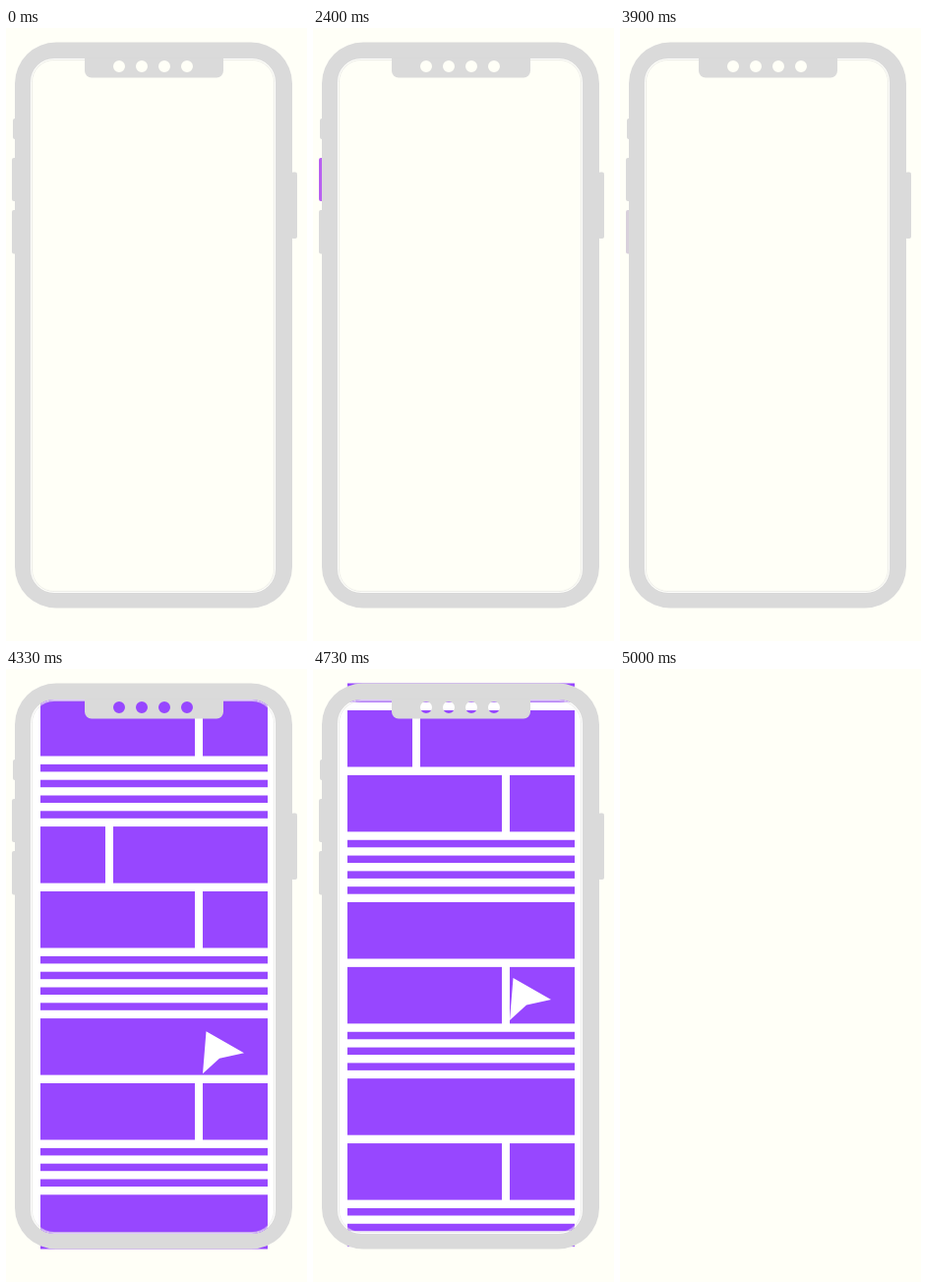
Animation of 306 by 623 pixels, one loop 5510 ms. Source, as an HTML page with a canvas:

```html
<!DOCTYPE html>
<html lang="en">
<head>
<meta charset="utf-8">
<title>Phone buttons and scroll</title>
<style>
  html, body { margin: 0; width: 100%; height: 100%; overflow: hidden; background: #fffff7; }
  canvas { display: block; width: 306px; height: 623px; }
</style>
</head>
<body>
<canvas id="stage" width="306" height="623"></canvas>
<script>
const ctx = document.getElementById('stage').getContext('2d');
const LOOP = 5510;
const PAPER = '#fffff7', PURPLE = '#9747ff', GREY = [218, 218, 218];
const rgb = c => `rgb(${c.map(Math.round).join(',')})`;
const clamp = v => Math.min(1, Math.max(0, v));
const progress = (t, from, to) => clamp((t - from) / (to - from));
const ease = p => (1 - Math.cos(Math.PI * p)) / 2;

// Rises quickly, holds near the middle, falls back
const pulse = (t, from, to) =>
  Math.min(1, 1.38 * Math.sin(Math.PI * progress(t, from, to)));

const buttons = [
  { x: 7, y: 92, w: 4, h: 21, tint: GREY, pulses: [] },
  { x: 6, y: 132, w: 5, h: 44, tint: [184, 96, 240], pulses: [[2100, 2915]] },
  { x: 6, y: 185, w: 5, h: 44.5, tint: [188, 82, 235], pulses: [[3100, 3915]] },
  { x: 290, y: 146.5, w: 6, h: 67.5, tint: [179, 125, 246], pulses: [[215, 1010], [1110, 1885]] }
];

// Numbers are the x of a split block (0 for a full one); 'l3' / 'l4' are text lines
const rows = [192, 'l4', 101, 192, 'l4', 0, 192, 'l3', 0, 192, 'l3', 0, 192, 'l3', 0];
const LEFT = 35, RIGHT = 266, BLOCK = 57.5, BLOCK_STEP = 65.9, LINE = 7.5, LINE_STEP = 15.8;

function roundRect(x, y, w, h, r) {
  ctx.roundRect(x, y, w, h, r);
}

function drawButtons(t) {
  for (const b of buttons) {
    const k = Math.max(0, ...b.pulses.map(([from, to]) => pulse(t, from, to)));
    ctx.fillStyle = rgb(GREY.map((g, i) => g + (b.tint[i] - g) * k));
    ctx.beginPath();
    roundRect(b.x, b.y, b.w, b.h, 2);
    ctx.fill();
  }
}

function drawRows(scroll) {
  let y = 31 - scroll;
  ctx.fillStyle = PURPLE;
  for (const row of rows) {
    if (typeof row === 'string') {
      for (let i = 0; i < +row[1]; i++, y += LINE_STEP) {
        ctx.fillRect(LEFT, y, RIGHT - LEFT, LINE);
      }
      continue;
    }
    if (row) {
      ctx.fillRect(LEFT, y, row - LEFT, BLOCK);
      ctx.fillRect(row + 8, y, RIGHT - row - 8, BLOCK);
    } else {
      ctx.fillRect(LEFT, y, RIGHT - LEFT, BLOCK);
    }
    y += BLOCK_STEP;
  }
}

function drawCursor(y) {
  ctx.fillStyle = '#fff';
  ctx.beginPath();
  ctx.moveTo(203.5, y);
  ctx.lineTo(242, y + 22);
  ctx.lineTo(217, y + 27.5);
  ctx.lineTo(200, y + 43);
  ctx.fill();
}

function drawContent(t) {
  const shown = progress(t, 3980, 4150);
  if (!shown) return;
  const scroll = 279 * ease(progress(t, 4510, 5000));
  const cursorY = 292 + 140 * ease(progress(t, 4130, 4510)) - scroll;
  ctx.save();
  ctx.globalAlpha = shown;
  ctx.fillStyle = '#fff';
  ctx.beginPath();
  roundRect(25, 31, 249, 543, 24);
  ctx.fill();
  ctx.beginPath();
  ctx.rect(LEFT, 14.5, RIGHT - LEFT, 575);
  ctx.clip();
  drawRows(scroll);
  drawCursor(cursorY);
  ctx.restore();
}

function outline(inset, color) {
  ctx.strokeStyle = color;
  ctx.beginPath();
  roundRect(25 + inset, 31 + inset, 249 - 2 * inset, 543 - 2 * inset, 24 - inset);
  ctx.stroke();
}

function drawPhone() {
  ctx.lineWidth = 0.7;
  outline(1.4, '#e2e2e0');
  outline(0.5, '#fff');

  ctx.fillStyle = rgb(GREY);
  ctx.beginPath();
  roundRect(9, 14.5, 282, 575, 42);
  roundRect(25, 31, 249, 543, 24);
  ctx.fill('evenodd');

  // Sensor holes let the screen show through the notch
  ctx.beginPath();
  roundRect(80, 30.5, 141, 20, [0, 0, 7, 7]);
  for (let i = 0; i < 4; i++) {
    const x = 115 + 23 * i;
    ctx.moveTo(x + 6, 39);
    ctx.arc(x, 39, 6, 0, 2 * Math.PI);
  }
  ctx.fill('evenodd');
}

function render(t) {
  ctx.fillStyle = PAPER;
  ctx.fillRect(0, 0, 306, 623);
  if (t >= 5000) return;
  drawContent(t);
  drawButtons(t);
  drawPhone();
}

const start = performance.now();
function frame(now) {
  render(Math.max(0, now - start) % LOOP);
  requestAnimationFrame(frame);
}
render(0);
requestAnimationFrame(frame);
</script>
</body>
</html>
```
